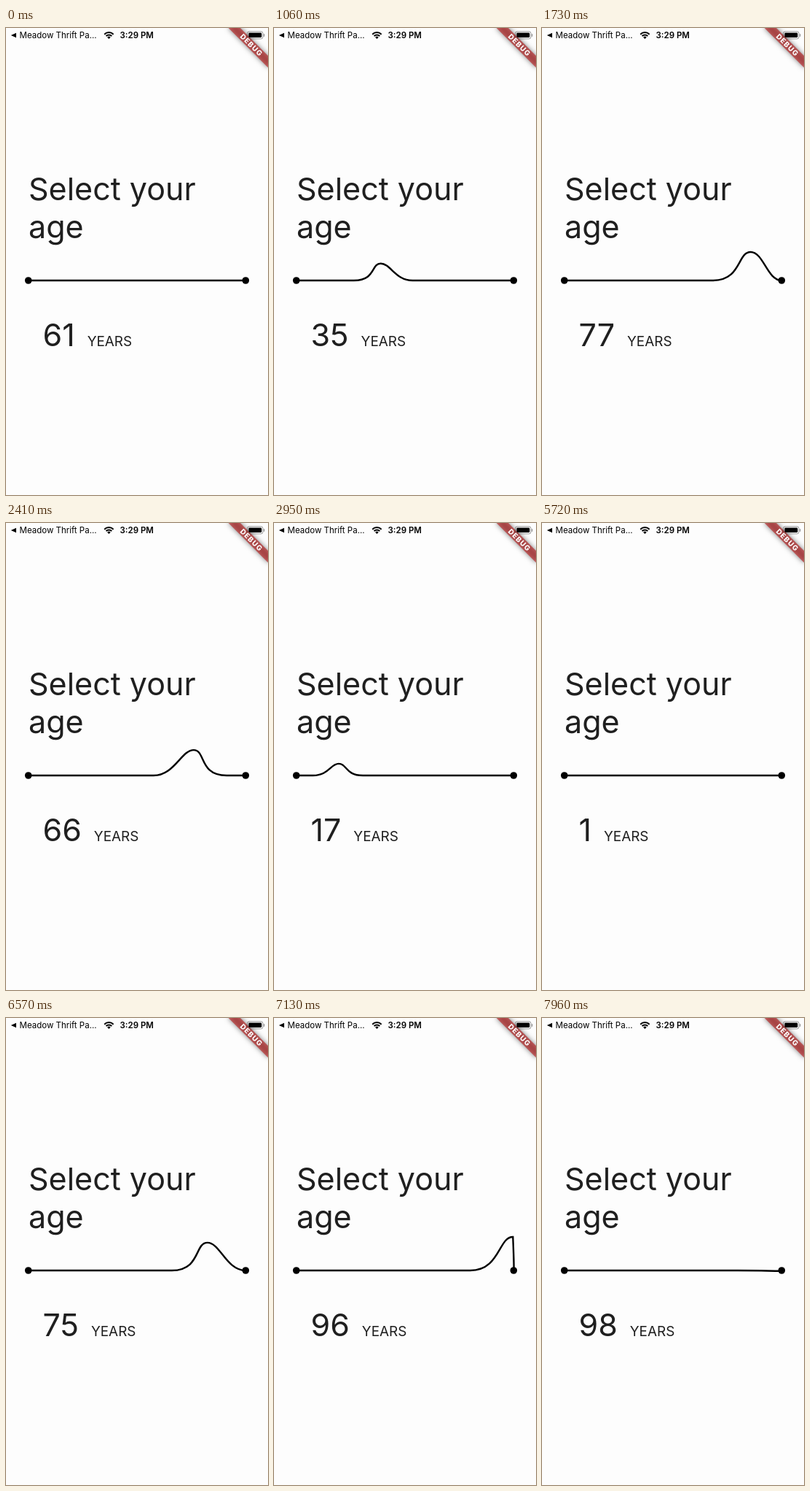
An HTML page with a canvas that plays this animation: 360x640 px, repeating every 8 s.

```html
<!DOCTYPE html>
<html lang="en">
<head>
<meta charset="utf-8">
<title>Age slider</title>
<style>
  html, body { margin: 0; width: 100%; height: 100%; overflow: hidden; background: #fdfdfd; }
  canvas, svg { position: absolute; left: 0; top: 0; width: 360px; height: 640px; }
  text { font-family: Inter, Roboto, sans-serif; fill: #1f1f1f; }
  .big { font-size: 43px; }
  .unit { font-size: 18.9px; }
  .bar { font-size: 11.5px; fill: #000; }
  .clock { font-weight: 600; }
  .debug { font-size: 9.8px; font-weight: 800; letter-spacing: 1px; fill: #fff; text-anchor: middle; }
</style>
</head>
<body>
<canvas id="stage"></canvas>
<svg viewBox="0 0 360 640">
  <text class="bar" x="18.5" y="14">Meadow Thrift Pa...</text>
  <text class="bar clock" x="156.5" y="14">3:29 PM</text>
  <text class="debug" transform="translate(360 0) rotate(45)" x="0.5" y="36.2">DEBUG</text>
  <text class="big" x="31" y="236">Select your</text>
  <text class="big" x="31" y="287.5">age</text>
  <text class="big" x="50.5" y="435.5"><tspan id="age">61</tspan><tspan class="unit" dx="17">YEARS</tspan></text>
</svg>
<script>
const LOOP = 8000;
const UNIT = 0.96;                       // pixels per layout point
const LEFT = 30.7, WIDTH = 298.6, BASE = 346;
const FULL_AGE = 90;                     // age at the right end of the line

// Screen refreshes: first time, last time, count
const refreshes = [
  [500, 1270, 8], [1390, 1850, 5], [2190, 2950, 8], [3060, 3370, 4],
  [3580, 3920, 4], [5720, 6460, 8], [6570, 7130, 6], [7280, 7960, 7]
];

// Finger drags: touch time, release time, [time, age] path
const drags = [
  { down: 500, up: 3530, path: [
    [500, 2], [610, 5], [720, 11.5], [1270, 52.3], [1730, 77.6], [1850, 83.7],
    [2150, 83.7], [2190, 86], [2230, 86], [2640, 42], [2840, 20],
    [2950, 17.2], [3170, 4], [3370, 0.2]] },
  { down: 5720, up: 7685, path: [
    [5720, 1.2], [5830, 4.5], [6020, 20], [6460, 65.5], [6570, 75.4],
    [6790, 89], [7130, 96.5], [7240, 96.5], [7500, 99.2], [7640, 98.4]] }
];

const canvas = document.getElementById('stage');
const ctx = canvas.getContext('2d');
const ageText = document.getElementById('age');
const ratio = window.devicePixelRatio || 1;
canvas.width = 360 * ratio;
canvas.height = 640 * ratio;

function snap(t) {
  let at = 0;
  for (const [first, last, count] of refreshes) {
    if (t < first) break;
    const gap = (last - first) / (count - 1);
    // Refreshes fall on multiples of 10 ms, so allow a little slack
    at = first + gap * Math.min(count - 1, Math.floor((t - first) / gap + 0.08));
  }
  return at;
}

function along(path, t) {
  if (t <= path[0][0]) return path[0][1];
  for (let i = 1; i < path.length; i++) {
    const [t0, a0] = path[i - 1], [t1, a1] = path[i];
    if (t < t1) return a0 + (a1 - a0) * (t - t0) / (t1 - t0);
  }
  return path[path.length - 1][1];
}

function elasticOut(t) {
  if (t >= 1) return 1;
  return 1 + 2 ** (-10 * t) * Math.sin((t - 0.1) * 5 * Math.PI);
}

function poseAt(t) {
  const drag = drags.filter(d => t >= d.down).pop();
  if (!drag) return { age: 61, part: 61 / FULL_AGE, lift: 0, bend: 0 };
  const age = along(drag.path, t);
  const part = age / FULL_AGE;
  const shift = (age - along(drag.path, t - 16.7)) / FULL_AGE * WIDTH / UNIT;
  const bend = Math.max(-25, Math.min(25, shift * 25 / 30)) * UNIT;
  let lift = t < drag.down + 50 ? 0 : 1;
  if (t >= drag.up) lift = 1 - elasticOut((t - drag.up) / 500);
  return { age, part, lift, bend };
}

function dot(x, y, r) {
  ctx.beginPath();
  ctx.arc(x, y, r, 0, 2 * Math.PI);
  ctx.fill();
}

function drawSlider({ part, lift, bend }) {
  const inside = x => LEFT + Math.max(0, Math.min(WIDTH, x));
  const pos = part * WIDTH;
  const spread = (20 + 20 * part) * UNIT;
  const mid = Math.min(pos, WIDTH);
  const top = BASE - (9.6 + 34 * part) * lift;
  const l0 = inside(mid - spread * 1.5), l1 = inside(mid - spread / 2);
  const r1 = inside(pos + spread / 2), r0 = inside(pos + spread * 1.5);
  const peak = LEFT + mid - bend;

  ctx.fillStyle = ctx.strokeStyle = '#000';
  dot(LEFT, BASE, 4.8);
  dot(LEFT + WIDTH, BASE, 4.8);
  ctx.lineWidth = 2.4;
  ctx.beginPath();
  ctx.moveTo(LEFT, BASE);
  if (lift) {
    ctx.lineTo(l0, BASE);
    ctx.bezierCurveTo(l1 + bend, BASE, l1 - bend, top, peak, top);
    ctx.bezierCurveTo(r1 - bend, top, r1 + bend, BASE, r0, BASE);
  }
  ctx.lineTo(LEFT + WIDTH, BASE);
  ctx.stroke();
}

function drawBanner() {
  const far = 2000;
  const band = [-40 * UNIT, 28 * UNIT, 80 * UNIT, 12 * UNIT];
  ctx.save();
  ctx.translate(360, 0);
  ctx.rotate(Math.PI / 4);
  // Only the shadow of this rectangle lands on the stage
  ctx.save();
  ctx.shadowColor = 'rgba(0,0,0,0.5)';
  ctx.shadowBlur = 7.6 * ratio;
  ctx.shadowOffsetX = far * ratio;
  ctx.fillStyle = '#000';
  ctx.fillRect(band[0] - far * Math.SQRT1_2, band[1] + far * Math.SQRT1_2, band[2], band[3]);
  ctx.restore();
  ctx.fillStyle = 'rgba(183,28,28,0.627)';
  ctx.fillRect(...band);
  ctx.restore();
}

function drawStatus() {
  ctx.fillStyle = ctx.strokeStyle = '#000';
  ctx.beginPath();
  ctx.moveTo(6.8, 10);
  ctx.lineTo(14, 6.7);
  ctx.lineTo(14, 13.3);
  ctx.fill();

  const from = -Math.PI * 0.75, to = -Math.PI * 0.25;
  ctx.lineWidth = 2;
  for (const r of [8.8, 5.5]) {
    ctx.beginPath();
    ctx.arc(141.4, 14.9, r, from, to);
    ctx.stroke();
  }
  ctx.beginPath();
  ctx.moveTo(141.4, 14.9);
  ctx.arc(141.4, 14.9, 3.2, from, to);
  ctx.fill();

  ctx.strokeStyle = ctx.fillStyle = 'rgba(0,0,0,0.4)';
  ctx.lineWidth = 1;
  ctx.beginPath();
  ctx.roundRect(331.5, 4.8, 21.5, 10, 2.6);
  ctx.stroke();
  ctx.beginPath();
  ctx.roundRect(354, 8, 1.3, 3.8, 0.6);
  ctx.fill();
  ctx.fillStyle = '#000';
  ctx.beginPath();
  ctx.roundRect(333.3, 6.5, 18, 6.6, 1.4);
  ctx.fill();
}

function render(now) {
  const pose = poseAt(snap(now % LOOP));
  ctx.setTransform(ratio, 0, 0, ratio, 0, 0);
  ctx.fillStyle = '#fdfdfd';
  ctx.fillRect(0, 0, 360, 640);
  drawBanner();
  drawStatus();
  drawSlider(pose);
  ageText.textContent = Math.floor(pose.age);
}

const start = performance.now();
function tick() {
  render(performance.now() - start);
  requestAnimationFrame(tick);
}
tick();
</script>
</body>
</html>
```
